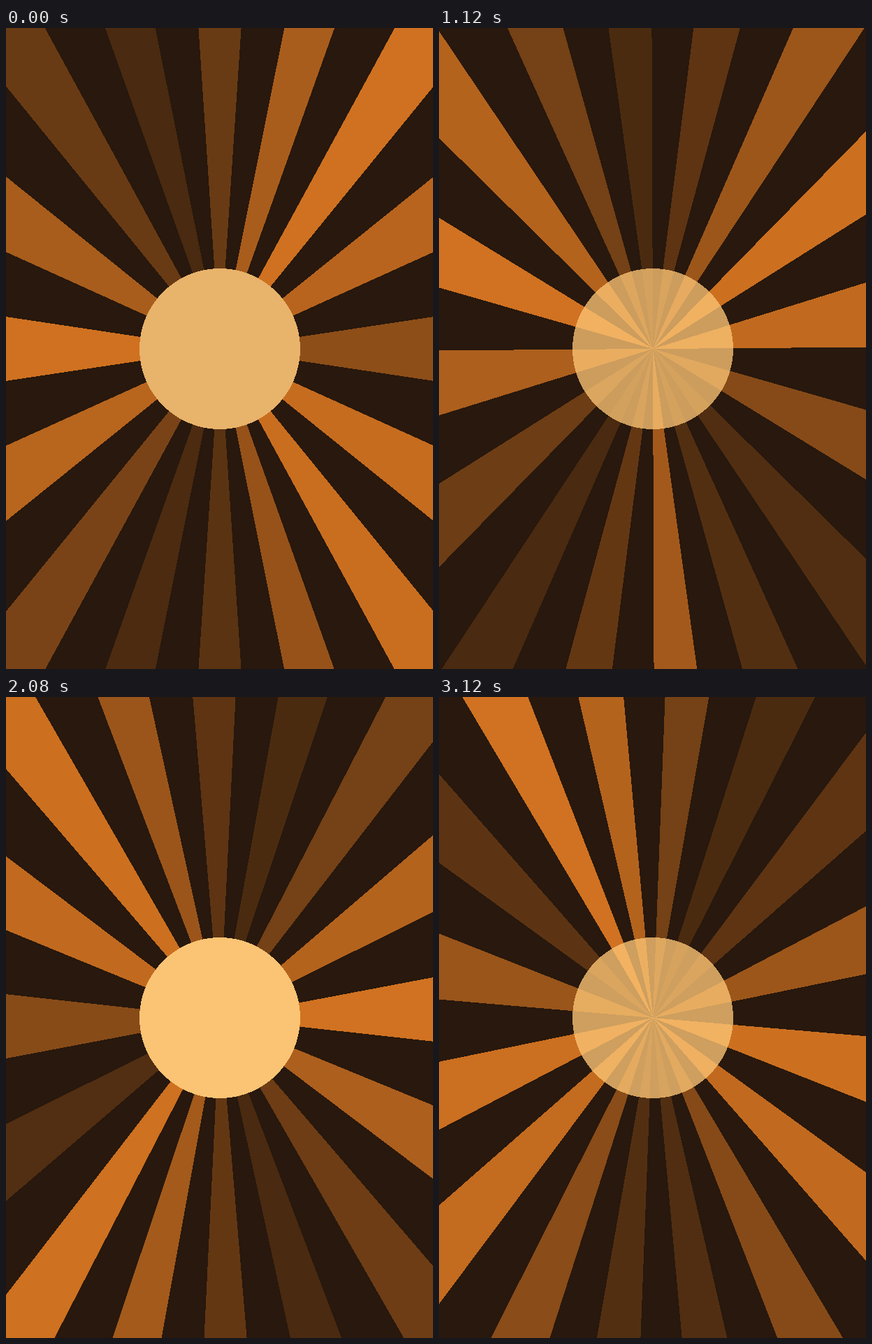
Write an HTML page without scripts that moves like this. It is 611 px wide and 917 px high and loops after 3200 ms.

```html
<!DOCTYPE html>
<html lang="en">
<head>
<meta charset="utf-8">
<title>Sunburst</title>
<style>
  /* One tick every 80 ms drives spin, ray shimmer and disc pulse */
  @property --tick {
    syntax: "<number>";
    inherits: true;
    initial-value: 0;
  }
  @keyframes run {
    from { --tick: 0; }
    to { --tick: 40; }
  }
  html, body {
    margin: 0;
    width: 100%;
    height: 100%;
    overflow: hidden;
    background: #28180d;
  }
  svg {
    display: block;
    width: 100%;
    height: 100%;
    shape-rendering: crispEdges;
    animation: run 3.2s steps(40) -2ms infinite;
  }
  .rays, .rays use { transform-origin: 0 0; }
  .rays { transform: rotate(calc(var(--tick) * 6deg)); }
  .rays use {
    fill: #d07221;
    transform: rotate(calc(var(--i) * 22.5deg));
    opacity: calc(.6 + .4 * sin(var(--i) * 1rad + var(--tick) * .2rad));
  }
  .sun { --wave: sin(var(--tick) * .3rad); }
  .disc {
    fill: #fbc474;
    opacity: calc(.88 + .12 * var(--wave));
  }
  /* Solid disc at the middle of the pulse */
  .flat {
    fill: #e8b36a;
    opacity: calc(1.1 - 9 * max(var(--wave), -1 * var(--wave)));
  }
</style>
</head>
<body>
<svg viewBox="-306 -459 611 917" preserveAspectRatio="none">
  <defs><path id="ray" d="M0 0L4 .4V-.4Z"/></defs>
  <g transform="scale(305.5 458.5)">
    <g class="rays">
      <use href="#ray" style="--i:0"/>
      <use href="#ray" style="--i:1"/>
      <use href="#ray" style="--i:2"/>
      <use href="#ray" style="--i:3"/>
      <use href="#ray" style="--i:4"/>
      <use href="#ray" style="--i:5"/>
      <use href="#ray" style="--i:6"/>
      <use href="#ray" style="--i:7"/>
      <use href="#ray" style="--i:8"/>
      <use href="#ray" style="--i:9"/>
      <use href="#ray" style="--i:10"/>
      <use href="#ray" style="--i:11"/>
      <use href="#ray" style="--i:12"/>
      <use href="#ray" style="--i:13"/>
      <use href="#ray" style="--i:14"/>
      <use href="#ray" style="--i:15"/>
    </g>
  </g>
  <g class="sun">
    <circle class="disc" r="115"/>
    <circle class="flat" r="115"/>
  </g>
</svg>
</body>
</html>
```
